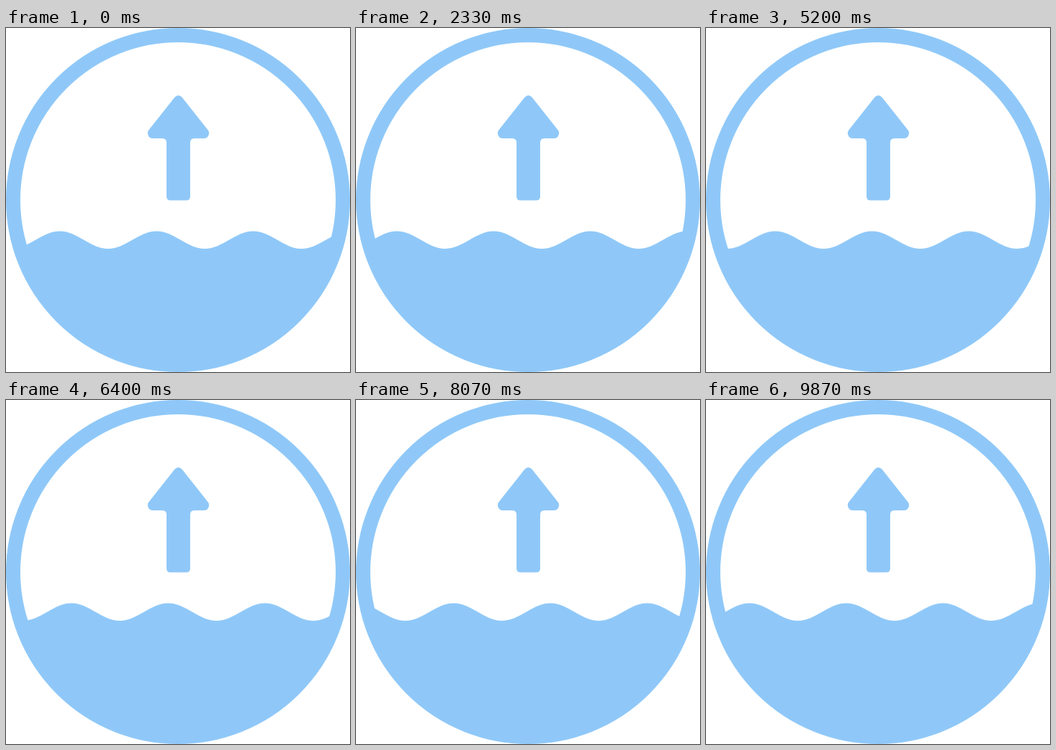
These frames come from a looping animation (480 px wide and 480 px high, 9.94 s). An HTML page without scripts:

```html
<!DOCTYPE html>
<html lang="en">
<head>
<meta charset="utf-8">
<title>Rising water</title>
<style>
  html, body { margin: 0; width: 100%; height: 100%; overflow: hidden; background: #fff; }
  svg { display: block; width: 100%; height: 100%; fill: #8fc8f8; }
  .ring { fill: none; stroke: #8fc8f8; stroke-width: 20; }

  /* Wavelength 135px, one wavelength per 1.25s, drawn at 15 steps per second */
  .water { animation: drift 9.94s -3.4ms infinite; }
  @keyframes drift {
    0% { transform: translateX(0); animation-timing-function: steps(149, jump-none); }
    99.933%, 100% { transform: translateX(1065.6px); }
  }
</style>
</head>
<body>
<svg viewBox="0 0 480 480">
  <defs>
    <clipPath id="bowl"><circle cx="240" cy="240" r="231"/></clipPath>
    <path id="wave" d="M0 283.5c24.6 0 42.9 24.5 67.5 24.5s42.9-24.5 67.5-24.5V490H0z"/>
    <g id="waves">
      <use href="#wave"/>
      <use href="#wave" x="135"/>
      <use href="#wave" x="270"/>
      <use href="#wave" x="405"/>
      <path d="M0 310H540V490H0z"/>
    </g>
  </defs>
  <g clip-path="url(#bowl)">
    <g class="water">
      <use href="#waves" x="-1140"/>
      <use href="#waves" x="-600"/>
      <use href="#waves" x="-60"/>
    </g>
    <path d="M0 309H480V480H0z"/>
  </g>
  <circle class="ring" cx="240" cy="240" r="230"/>
  <path d="M235.500 96.500Q240.500 91.500 245.500 96.500L281.500 142Q284 145 283 148.500Q281.500 154 276 154H263Q257 154 257 160V235Q257 240.500 251.500 240.500H229.500Q224 240.500 224 235V160Q224 154 218 154H205Q199.500 154 198 148.500Q197 145 199.500 142z"/>
</svg>
</body>
</html>
```
